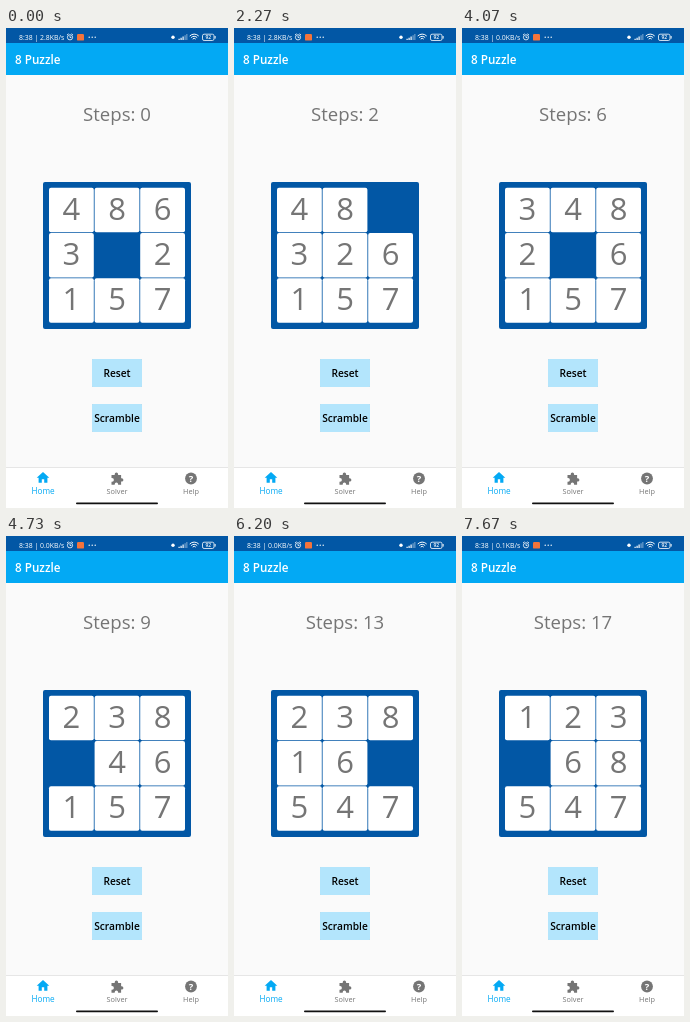
An HTML page that plays this animation: 222x480 px, repeating every 8000 ms.

```html
<!DOCTYPE html>
<html lang="en">
<head>
<meta charset="utf-8">
<title>8 Puzzle</title>
<style>
  html, body { margin: 0; height: 100%; overflow: hidden; background: #fafafa; }
  svg { display: block; width: 100vw; height: 100vh; font-family: "Open Sans", "Noto Sans", sans-serif; }
  .mid { text-anchor: middle; }
  .semi { font-weight: 600; }
  .button rect { fill: #b3e5fc; filter: drop-shadow(0 .8px .7px #0004); }
</style>
</head>
<body>
<svg viewBox="0 0 222 480">
  <rect width="222" height="480" fill="#fafafa"/>
  <rect y="15" width="222" height="32" fill="#03a9f4"/>
  <rect width="222" height="15" fill="#0257a5"/>

  <!-- status bar -->
  <g fill="#fff">
    <text id="status" x="13" y="11.8" font-size="6.9"></text>
    <g fill="none" stroke="#fff" stroke-width=".8">
      <circle cx="64" cy="9.3" r="2.6"/>
      <path d="M64 7.7v1.8h1.4M61 7l1.5-1.3M67 7l-1.5-1.3"/>
    </g>
    <rect x="71" y="6" width="7" height="6.6" rx="1.2" fill="#f4743b"/>
    <circle cx="83.2" cy="9.3" r=".7"/><circle cx="86.2" cy="9.3" r=".7"/><circle cx="89.2" cy="9.3" r=".7"/>
    <circle cx="167" cy="9.3" r="1.7"/>
    <path d="M172.500 12v-1.300h1.200V12zM174.500 12V9.700h1.200V12zM176.500 12V8.500h1.200V12z"/>
    <path d="M178.500 12V7.200h1.200V12zM180.300 12V6h1.100v6z" opacity=".45"/>
    <path d="M183.700 8a6.300 6.300 0 0 1 9 0M185.200 9.600a4.200 4.200 0 0 1 6 0M186.700 11.100a2 2 0 0 1 3 0" fill="none" stroke="#fff"/>
    <rect x="196.500" y="6.200" width="11.500" height="6.300" rx="1.600" fill="none" stroke="#fff" stroke-width=".8"/>
    <rect x="208.600" y="8" width="1" height="2.600"/>
    <text class="mid semi" x="202.300" y="11.200" font-size="5">92</text>
  </g>
  <text class="semi" x="9" y="35.600" font-size="11.700" fill="#fff">8 Puzzle</text>

  <!-- game -->
  <text id="steps" class="mid" x="111" y="93" font-size="18.600" fill="#757575"></text>
  <rect x="37" y="154" width="148" height="147" rx="2" fill="#0257a5"/>
  <g id="board"></g>
  <g class="button mid semi" font-size="10.200">
    <rect x="86" y="331" width="50" height="28" rx="1"/><text x="111" y="348.700">Reset</text>
    <rect x="86" y="376" width="50" height="28" rx="1"/><text x="111" y="393.700">Scramble</text>
  </g>

  <!-- navigation -->
  <rect y="439" width="222" height="1" fill="#e6e6e6"/>
  <rect y="440" width="222" height="40" fill="#fff"/>
  <g class="mid" fill="#757575" font-size="7.300">
    <g fill="#03a9f4">
      <path d="M37 444l6.300 5.700h-1.900v5h-3.200v-3.500h-2.400v3.500h-3.200v-5h-1.900z"/>
      <text x="37" y="465.800" font-size="8.200">Home</text>
    </g>
    <path d="M105.500 447h3.200v-.8a1.700 1.700 0 0 1 3.400 0v.8h3v3.200h.6a1.700 1.700 0 0 1 0 3.400h-.6v3.200h-3v-.6a1.700 1.700 0 0 0-3.400 0v.6h-3.200v-3.100h.6a1.800 1.800 0 0 0 0-3.600h-.6z"/>
    <text x="111" y="465.800">Solver</text>
    <circle cx="185" cy="450.500" r="5.900"/>
    <text x="185" y="454" font-size="9.500" font-weight="700" fill="#fff">?</text>
    <text x="185" y="465.800">Help</text>
  </g>
  <rect x="70" y="474.500" width="82" height="1.700" rx=".85" fill="#111"/>
</svg>
<script>
const LOOP = 8000;
const START = [4, 8, 6, 3, 0, 2, 1, 5, 7];
// Each move: time in ms and the cell that becomes empty.
const MOVES = [
  [1730, 5], [2130, 2], [2530, 1], [3070, 0], [3470, 3], [3670, 4],
  [4130, 1], [4470, 0], [4730, 3], [4930, 6], [5200, 7], [5530, 4],
  [5930, 5], [6330, 2], [6670, 1], [6930, 0], [7270, 3]
];
const byId = id => document.getElementById(id);

function boardAfter(steps) {
  const cells = [...START];
  let gap = cells.indexOf(0);
  for (const [, next] of MOVES.slice(0, steps)) {
    cells[gap] = cells[next];
    cells[next] = 0;
    gap = next;
  }
  return cells;
}

function tile(value, i) {
  if (!value) return "";
  const x = 43 + i % 3 * 45.6, y = 159.800 + Math.floor(i / 3) * 45.200;
  return `<rect x="${x}" y="${y}" width="44.800" height="44.500" rx="2" fill="#fff"/>
    <text class="mid" x="${x + 22.400}" y="${y + 32.200}" font-size="31" fill="#757575">${value}</text>`;
}

let shown = -1;
function draw(now) {
  const t = now % LOOP;
  const steps = MOVES.filter(([at]) => at <= t).length;
  const speed = t < 3070 ? "2.8" : t < 7070 ? "0.0" : "0.1";
  byId("status").textContent = `8:38 | ${speed}KB/s`;
  if (steps !== shown) {
    byId("steps").textContent = "Steps: " + steps;
    byId("board").innerHTML = boardAfter(steps).map(tile).join("");
    shown = steps;
  }
  requestAnimationFrame(draw);
}
draw(0);
</script>
</body>
</html>
```
